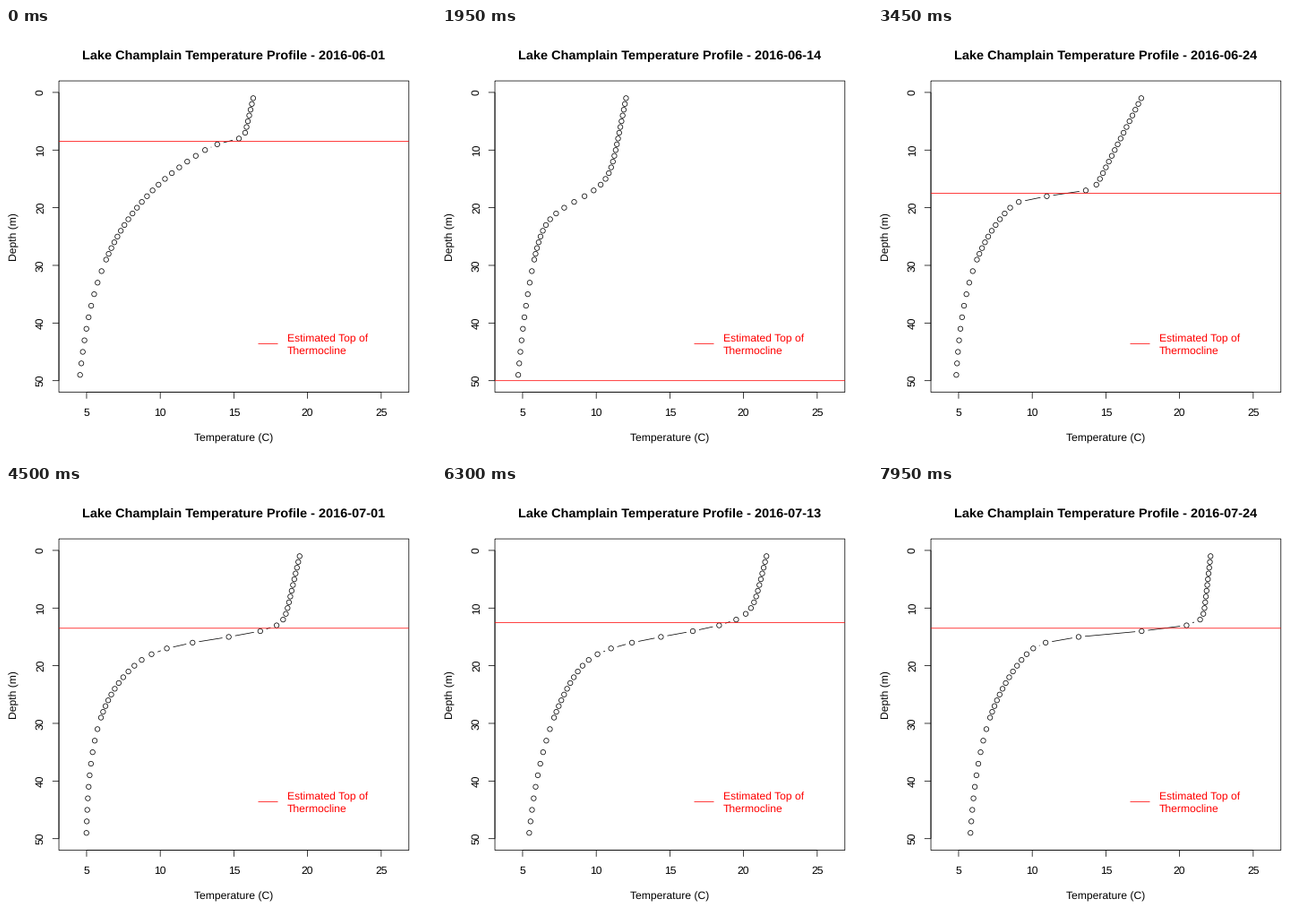
These frames come from a looping animation (480 by 480 pixels, 8000 ms). A matplotlib script:

```python
import numpy as np
import matplotlib.pyplot as plt
from matplotlib.animation import FuncAnimation
from matplotlib.collections import LineCollection

SIZE, DPI = 480, 72
INTERVAL, FRAMES, FRAMES_PER_DAY = 50, 160, 3
LEFT, RIGHT, TOP, BOTTOM = 59.04, 449.76, 59.04, 406.56
DEGREE = (RIGHT - LEFT) / 23.76
METRE = (BOTTOM - TOP) / 54
MID_X, MID_Y = (LEFT + RIGHT) / 2, (TOP + BOTTOM) / 2
LINE_WIDTH, RADIUS, GAP, TICK = 0.75, 2.7, 7.2, 7.2
MAX_DEPTH = 50
DEPTHS = np.r_[1:30, 31:50:2]

plt.rcParams.update({
    "font.family": "Liberation Sans",
    "font.size": 12.1,
    "text.hinting": "no_hinting",
})

# Lake state on key days: day, surface temperature, cooling per metre,
# thermocline depth and thickness, deep excess, its decay length, floor.
STATES = np.array([
    (0, 16.4, 0.09, 8.3, 0.3, 10.2, 14, 4.0),
    (13, 12.1, 0.077, 18.6, 1.55, 2.9, 21.5, 4.0),
    (23, 17.6, 0.2, 17.77, 0.4, 4.8, 10.5, 4.6),
    (30, 19.55, 0.09, 15, 0.85, 6.2, 8, 4.9),
    (37, 21.9, 0.08, 13.2, 1.35, 5.4, 23, 4.0),
    (47, 21.4, 0.11, 15.8, 1.1, 6.4, 8.3, 5.6),
    (53, 22.15, 0.045, 14.25, 0.6, 5.6, 12, 5.5),
])


def temp_x(temp):
    return LEFT + (temp - 3.12) * DEGREE


def depth_y(depth):
    return TOP + (depth + 2) * METRE


def profile(day):
    """Mixed upper layer blending into exponentially cooling deep water."""
    surface, cooling, centre, width, excess, decay, floor = (
        np.interp(day, STATES[:, 0], column) for column in STATES.T[1:])
    below = DEPTHS - centre
    upper = surface - cooling * DEPTHS
    deep = floor + excess * np.exp(-below / decay)
    return deep + (upper - deep) / (1 + np.exp(below / width))


def thermocline(temps):
    """Middle of the first step that cools by more than a degree."""
    steep = np.flatnonzero(-np.diff(temps) > 1)
    return DEPTHS[steep[0]] + 0.5 if len(steep) else MAX_DEPTH


fig = plt.figure(figsize=(SIZE / DPI, SIZE / DPI), dpi=DPI, facecolor="white")
ax = fig.add_axes([0, 0, 1, 1])
ax.set(xlim=(0, SIZE), ylim=(SIZE, 0))
ax.axis("off")


def line(xs, ys, color="black", **kw):
    return ax.plot(xs, ys, color=color, lw=LINE_WIDTH, snap=False,
                   solid_capstyle="butt", **kw)[0]


def label(x, y, text, ha="center", **kw):
    return ax.text(x, y, text, ha=ha, va="baseline",
                   rotation_mode="anchor", **kw)


line([LEFT, RIGHT, RIGHT, LEFT, LEFT], [TOP, TOP, BOTTOM, BOTTOM, TOP],
     solid_joinstyle="miter")

line([temp_x(5), temp_x(25)], [BOTTOM, BOTTOM])
for temp in range(5, 26, 5):
    x = temp_x(temp)
    line([x, x], [BOTTOM, BOTTOM + TICK])
    label(x, 432.6, str(temp))

line([LEFT, LEFT], [depth_y(0), depth_y(MAX_DEPTH)])
for depth in range(0, MAX_DEPTH + 1, 10):
    y = depth_y(depth)
    line([LEFT - TICK, LEFT], [y, y])
    label(41.8, y, str(depth), rotation=90)

label(MID_X, 461.6, "Temperature (C)")
label(13, MID_Y, "Depth (m)", rotation=90)
line([281.5, 303.5], [352.4, 352.4], "red")
label(314, 350.2, "Estimated Top of", ha="left", color="red")
label(314, 363.9, "Thermocline", ha="left", color="red")

title = label(MID_X, 34.8, "", fontsize=14.47, weight="bold")
strokes = LineCollection([], colors="black", linewidths=LINE_WIDTH,
                         snap=False, zorder=3)
ax.add_collection(strokes)
marker_line = line([], [], "red", zorder=4)

angle = np.linspace(0, 2 * np.pi, 33)
RING = RADIUS * np.column_stack([np.cos(angle), np.sin(angle)])


def connectors(points):
    """Lines between neighbours, kept clear of the rings."""
    for a, b in zip(points[:-1], points[1:]):
        length = np.hypot(*(b - a))
        if length > 2 * GAP:
            step = (b - a) * GAP / length
            yield np.array([a + step, b - step])


def update(frame):
    day = frame // FRAMES_PER_DAY
    temps = profile(day)
    points = np.column_stack([temp_x(temps), depth_y(DEPTHS)])
    strokes.set_segments([p + RING for p in points] + list(connectors(points)))
    marker_line.set_data([LEFT, RIGHT], [depth_y(thermocline(temps))] * 2)

    date = np.datetime64("2016-06-01") + day
    title.set_text(f"Lake Champlain Temperature Profile - {date}")
    return strokes, marker_line, title


anim = FuncAnimation(fig, update, frames=FRAMES, interval=INTERVAL,
                     repeat=True, repeat_delay=0)
plt.show()
```
